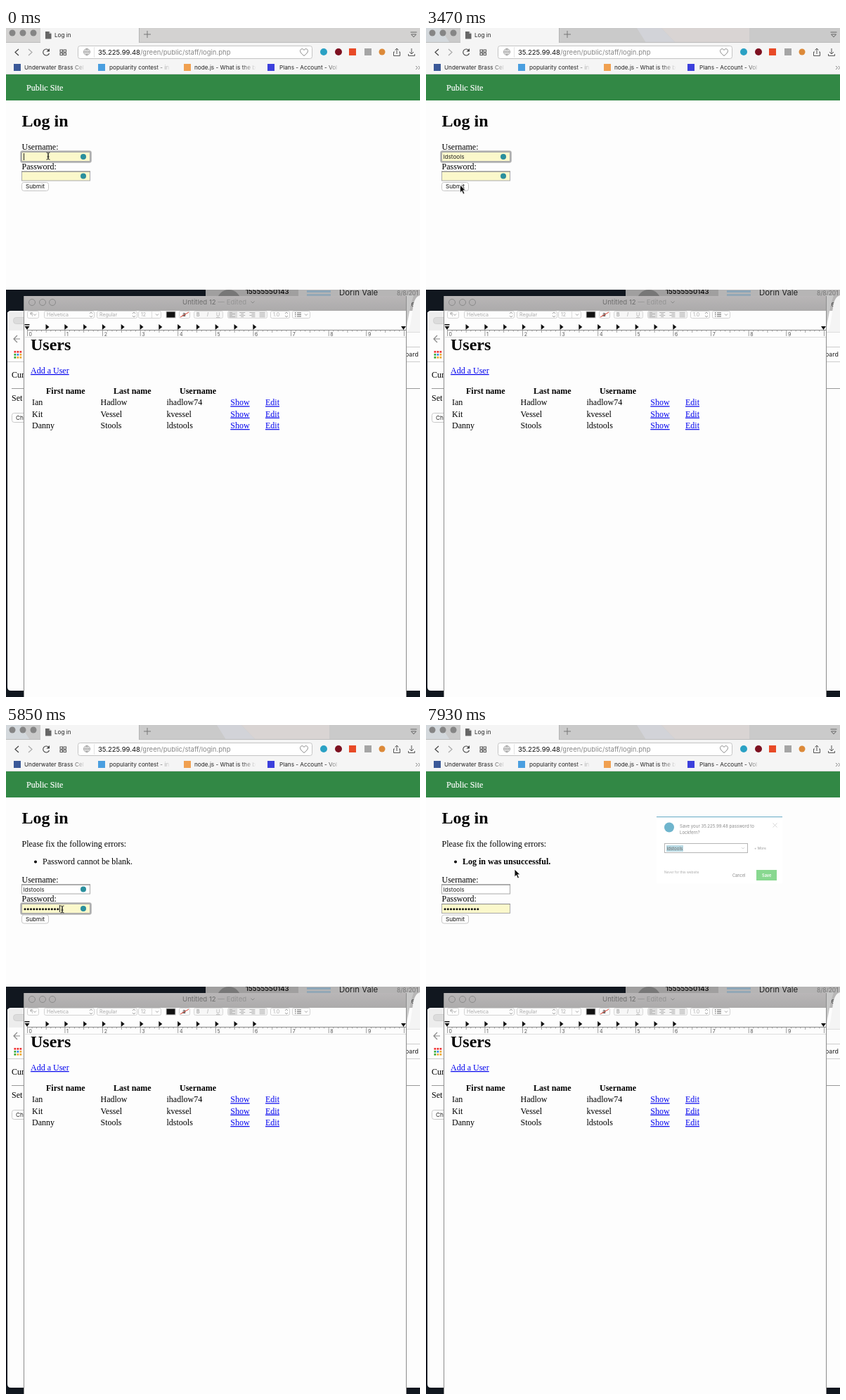
Recreate the animation shown at these times as an HTML page. Size 589 by 951 pixels, loop 8000 ms.

```html
<!DOCTYPE html>
<html lang="en">
<head>
<meta charset="utf-8">
<title>Log in</title>
<style>
  html, body { margin: 0; height: 100%; overflow: hidden; background: #fdfdfd; }
  svg { display: block; width: 100vw; height: 100vh; }
  text { font: 12px "Liberation Serif", Times, serif; white-space: pre; }
  .ui { font-family: Inter, sans-serif; }
  .b { font-weight: bold; }
  .link { fill: #00e; text-decoration: underline; }
</style>
</head>
<body>
<svg viewBox="0 0 589 951" xmlns="http://www.w3.org/2000/svg">
  <defs>
    <linearGradient id="fade">
      <stop stop-color="#f5f5f5" stop-opacity="0"/>
      <stop offset=".6" stop-color="#f5f5f5"/>
    </linearGradient>
    <linearGradient id="title" x2="0" y2="1">
      <stop stop-color="#b9b6b7"/>
      <stop offset="1" stop-color="#acabab"/>
    </linearGradient>
  </defs>
  <g id="still"></g>
  <g id="live"></g>
</svg>
<script>
const LOOP = 8000, START = 1390, STEP = 148.2;
const USER = 'ldstools';

const rect = (x, y, w, h, fill, more = '') =>
  `<rect x="${x}" y="${y}" width="${w}" height="${h}" fill="${fill}" ${more}/>`;
const dot = (x, y, r, fill, more = '') =>
  `<circle cx="${x}" cy="${y}" r="${r}" fill="${fill}" ${more}/>`;
const line = (d, color, width = 1, fill = 'none') =>
  `<path d="${d}" fill="${fill}" stroke="${color}" stroke-width="${width}"/>`;
const shape = (d, fill) => `<path d="${d}" fill="${fill}"/>`;
const text = (x, y, s, more = '') => `<text x="${x}" y="${y}" ${more}>${s}</text>`;
const serif = (x, y, s, size = 12, cls = '') =>
  text(x, y, s, `class="${cls}" style="font-size:${size}px"`);
const ui = (x, y, s, size = 8.2, fill = '#222', weight = 400) =>
  text(x, y, s, `class="ui" fill="${fill}" style="font-size:${size}px;font-weight:${weight}"`);
const box = (x, y, w, h, r = 2, fill = '#fff', stroke = '#c8c8c8') =>
  rect(x + .5, y + .5, w - 1, h - 1, fill, `rx="${r}" stroke="${stroke}"`);
const range = n => [...Array(n).keys()];

function browser() {
  const marks = [
    [11, '#3b5998', 26, 'Underwater Brass Cel'],
    [131, '#4a9fe0', 147, 'popularity contest - in'],
    [253, '#f0a050', 268, 'node.js - What is the b'],
    [372, '#3c40dc', 389, 'Plans - Account - Vol'],
  ];
  return rect(0, 0, 589, 372, '#fdfdfd') +
    rect(0, 21, 589, 45, '#f5f5f5') +
    line('M15 0m3 30l-5 4.5 5 4.5', '#444', 1.2) +
    line('M32 30l5 4.5-5 4.5', '#aaa', 1.2) +
    [[77, 31], [82, 31], [77, 35.5], [82, 35.5]]
      .map(([x, y]) => rect(x, y, 3.5, 3, 'none', 'stroke="#555"')).join('') +
    box(102, 25, 334, 19, 3, '#fff', '#c4c4c4') +
    dot(115, 34, 4.5, 'none', 'stroke="#888" stroke-width=".8"') +
    line('M110.500 34h9M115 29.500v9M115 29.500q-5 4.500 0 9q5-4.500 0-9', '#888', .7) +
    line('M125.500 27v15', '#e2e2e2') +
    ui(131, 38, '35.225.99.48<tspan fill="#888">/green/public/staff/login.php</tspan>', 9.5, '#111') +
    line('M424 39.500c-3-2.500-5.500-4.500-5.500-7c0-3 4-4 5.500-1c1.500-3 5.500-2 5.500 1c0 2.500-2.500 4.500-5.500 7z', '#888') +
    dot(452, 34, 5, '#2ba1c4') + dot(473, 34, 5, '#7d1020') +
    rect(488, 29, 10, 10, '#e84a27') + rect(510, 29, 10, 10, '#a5a5a5') +
    dot(535, 34, 4.5, '#dc8a3a') +
    line('M553 34h-1.500v5.500h9V34H559M556 37v-8m-2.500 2.500l2.500-2.500 2.500 2.500', '#555') +
    line('M572.500 37v2.500h9V37M577 29v8m-3-3l3 3 3-3', '#555') +
    marks.map(([x, color, tx, s]) =>
      rect(x, 51, 10, 10, color) + ui(tx, 59, s) +
      rect(tx + 66, 49, 36, 14, 'url(#fade)')).join('') +
    line('M583 54l2.500 2.500-2.500 2.500m3.500-5l2.500 2.500-2.500 2.500', '#666', .8) +
    rect(0, 65, 589, 1, '#d8d8d8') +
    rect(0, 66, 589, 37, '#328845') +
    text(29, 89, 'Public Site', 'fill="#fff" stroke="#fff" stroke-width=".2"') +
    serif(22.5, 140, 'Log in', 24, 'b');
}

function desktop() {
  const apps = ['#e33', '#e33', '#e33', '#3a3', '#38e', '#ea3', '#3a3', '#ea3', '#ea3'];
  return rect(0, 371, 589, 580, '#11171f') +
    rect(284, 372, 305, 40, '#a09f9f') + rect(416, 372, 173, 40, '#b6b5b5') +
    dot(317, 389, 17, '#777') +
    ui(341, 378, '15555550143', 9.5, '#111', 600) +
    rect(428, 373, 34, 3, '#8ba5b8') + rect(428, 378, 34, 4, '#93a8b6') +
    ui(474, 380, 'Dorin Vale', 11.4, '#222') +
    ui(556, 380, '8/8/201', 8.5, '#777') + ui(568, 396, 'me...', 9.5, '#444') +
    shape('M2 407q0-5 5-5H589V942H7q-5 0-5-5z', '#fdfdfd') +
    rect(2, 404, 24, 26, '#ededed') + box(10, 411, 24, 10, 4, '#dcdcdc', '#d0d0d0') +
    shape('M569 380h11q-7 22-11 52z', '#c8c8c8') +
    shape('M589 380v52h-20q5 0 7-15l3-20q2-15 10-17z', '#f4f4f4') +
    line('M20 442H11m5-5l-5 5 5 5', '#888', 1.2) +
    apps.map((c, i) => rect(11.5 + i % 3 * 4, 459 + (i / 3 | 0) * 4, 2.7, 2.7, c)).join('') +
    rect(2, 474, 587, 1, '#ccc') + rect(569, 453, 20, 1, '#ccc') +
    rect(569, 432, 20, 1, '#ddd') + ui(568, 467, 'oard', 8.8) +
    serif(8, 497, 'Cur') + rect(8, 512, 581, 1, '#999') + serif(8, 530, 'Set') +
    box(8, 547, 30, 14, 3) + ui(14, 557, 'Ch');
}

function ruler() {
  const inch = 53.6;
  return rect(30, 429, 539, 1, '#888') + rect(27, 439, 542, 1, '#ddd') +
    range(81).map(i => rect(30 + i * inch / 8, 430, .7, i % 8 ? (i % 4 ? 1.5 : 3) : 8, '#777')).join('') +
    range(10).map(i => ui(32.5 + i * inch, 437.5, i, 7, '#555')).join('') +
    range(12).map(i => shape(`M${56.5 + i * 26.8} 421v8l5-4z`, '#111')).join('') +
    shape('M26.500 421h7v1.500h-7zM26.500 424h7l-3.500 5zM562 424h7l-3.500 5z', '#111');
}

function editor() {
  const popups = [[30, 17, '¶'], [54, 72, 'Helvetica'], [129, 58, 'Regular'], [188, 33, '12'], [376, 28, '1.0'], [407, 26, '']];
  const people = [
    ['Ian', 'Hadlow', 'ihadlow74'],
    ['Kit', 'Vessel', 'kvessel'],
    ['Danny', 'Stools', USER],
  ];
  const cols = [37, 134.5, 228.5];
  const align = [[4, 8, 4, 8], [8, 4, 8, 4], [8, 5, 8, 5], [8, 8, 8, 8]];
  return rect(25, 381, 545, 570, '#8c8c8c') + rect(26, 402, 543, 549, '#fdfdfd') +
    rect(26, 381, 543, 21, 'url(#title)') +
    [37, 52, 66].map(x => dot(x, 390, 4.5, 'none', 'stroke="#8b8b8b"')).join('') +
    ui(251, 393, 'Untitled 12 <tspan fill="#949494">— Edited</tspan>', 9.6, '#6e6e6e') +
    line('M348.500 388.500l2.500 2.500 2.500-2.500', '#888') +
    popups.map(([x, w, s]) => box(x, 402, w, 11, 2, '#fdfdfd', '#d2d2d2') +
      ui(x + 4, 410, s, 7, '#aaa') +
      line(w > 50 || s === '1.0'
        ? `M${x + w - 7} 406l2-2 2 2m0 3l-2 2-2-2`
        : `M${x + w - 8} 406.500l2 2 2-2`, '#888', .8)).join('') +
    rect(411, 404.5, 1, 1, '#555') + line('M411 405h1.500m1.500 0h6m-9 2.500h1.500m1.500 0h6m-9 2.500h1.500m1.500 0h6', '#666') +
    rect(207, 403, 1, 9, '#ddd') +
    rect(228, 403, 13, 9, '#111', 'stroke="#ccc"') +
    box(246, 402, 16, 11, 2, '#fdfdfd', '#d2d2d2') +
    ui(251, 410, 'a', 8, '#333', 600) + line('M248 411l12-7', '#d43b2b') +
    box(267, 402, 42, 11, 2, '#f7f7f7', '#d8d8d8') +
    ui(271, 410, 'B', 7, '#aaa', 700) + ui(286, 410, '<tspan font-style="italic">I</tspan>', 7, '#aaa') +
    ui(299, 410, '<tspan text-decoration="underline">U</tspan>', 7, '#aaa') +
    box(315, 402, 57, 11, 2, '#f5f5f5', '#d8d8d8') + rect(316, 403, 13, 9, '#ddd') +
    align.map((rows, i) => rows.map((w, j) =>
      rect(318 + i * 14.2 + [0, (8 - w) / 2, 8 - w, 0][i], 404 + j * 2, w, 1, '#b0b0b0')).join('')).join('') +
    ruler() +
    serif(35, 458, 'Users', 24, 'b') + serif(35, 491, 'Add a User', 12, 'link') +
    serif(57, 520, 'First name', 12, 'b') + serif(153, 520, 'Last name', 12, 'b') +
    serif(247, 520, 'Username', 12, 'b') +
    people.map((row, i) => {
      const y = 536.3 + i * 16.4;
      return row.map((s, j) => serif(cols[j], y, s)).join('') +
        serif(319.3, y, 'Show', 12, 'link') + serif(369, y, 'Edit', 12, 'link');
    }).join('');
}

function tabs(t, loading, step) {
  const spinner = range(10).map(i =>
    `<path d="M60 6.500v-2.500" stroke="#555" stroke-opacity="${.2 + (i + 10 - step % 10) % 10 * .08}" transform="rotate(${i * 36} 60 10)"/>`).join('');
  const page = shape('M56 5h5.500l3 3v7.500h-8.500z', '#666') + shape('M61.500 5v3h3z', '#ccc');
  const reload = line('M61 32a4.500 4.500 0 1 0 .5 4', '#444', 1.1) + shape('M62 29v4.500h-4.500z', '#444');
  return rect(0, 0, 589, 21, t < 150 ? '#d3d2d1' : '#cacaca') +
    (t < 150 ? '' : shape('M0 0h20l14 21H0z', '#d3d8dc') +
      shape('M300 0h35l20 21h-42z', '#d2d3d8') + shape('M335 0h125v21H355z', '#d9d4d3')) +
    [9, 24, 39].map(x => dot(x, 7, 4.5, '#858585')).join('') +
    rect(49, 0, 140, 21, '#f5f5f5') + rect(189, 0, 1, 21, '#b4b4b4') +
    rect(0, 20, 49, 1, '#bcbcbc') + rect(190, 20, 399, 1, '#bcbcbc') +
    (loading ? spinner + ui(69, 13, 'https://35.225.99.48/green/p', 8.2) + rect(168, 3, 21, 14, 'url(#fade)')
             : page + ui(69, 13, 'Log in', 8.1)) +
    line('M196 9h10m-5-5v10', '#777') +
    line('M575.500 6h9M576.500 9h7l-3.500 4z', '#666') +
    (loading ? line('M53 30.500l8 8m0-8l-8 8', '#444', 1.1) : reload);
}

function field(y, value, { focus, yellow, icon, caret }) {
  const x = 22;
  let s = focus ? rect(x - .5, y - .5, 99, 15, 'none', 'rx="2" stroke="#999" stroke-width="2.6" opacity=".75"') : '';
  s += rect(x + .5, y + .5, 97, 13, yellow ? '#fbf8cb' : '#fff', 'stroke="#aaa"');
  if (!focus) s += rect(x, y, 98, 1, '#888');
  let end = 24.5;
  if (typeof value === 'number') {
    s += range(value).map(i => dot(27 + i * 4.25, y + 7.7, 1.5, '#111')).join('');
    end += value * 4.25;
  } else {
    s += ui(24.5, y + 10, value, 8.2);
    end += value.length * 3.9;
  }
  if (icon) s += dot(110, y + 7, 4, '#2a8f9d');
  if (caret) s += rect(Math.round(end), y + 2, 1, 10, '#222');
  return s;
}

function popup() {
  return rect(328, 130, 179, 95, '#fff') + rect(328, 130, 179, 1.2, '#79b4cc') +
    dot(346, 145.5, 7, '#6fb5cd') +
    ui(361, 146, 'Save your 35.225.99.48 password to', 6.1, '#8a8a8a') +
    ui(361, 154.5, 'Lockfern?', 6.1, '#8a8a8a') +
    line('M493.500 139.500l6 6m0-6l-6 6', '#ccc', .8) +
    box(339, 168, 119, 14, 0, '#fff', '#b5b5b5') + rect(342, 171, 24, 9, '#b8d8e2') +
    ui(342.5, 177.7, USER, 6.2, '#666') + line('M449 174l2 2 2-2', '#ccc', .8) +
    ui(467, 177, '+ More', 5, '#999') + ui(339, 211, 'Never for this website', 4.8, '#aaa') +
    ui(436, 216, 'Cancel', 5.6, '#888') +
    rect(470, 206, 29, 15, '#88d890') + ui(478, 216, 'Save', 5.6, '#fff', 600);
}

// Pointer stops: step, x, y
const path = [
  [-10, 60, 182], [8, 60, 182], [9, 78, 190], [10, 78, 190], [15, 45, 227], [19, 45, 227],
  [22, 230, 252], [24, 225, 256], [26, 80, 262], [31, 80, 262], [34, 10, 290],
  [36, 38, 265], [39, 38, 265], [40, 42, 275], [41, 42, 275], [44, 126, 205], [46, 126, 205],
];

function pointer(step, fieldTops) {
  const i = path.findIndex(p => p[0] > step);
  const [a, b] = [path[i - 1], path[i]];
  const k = (step - a[0]) / (b[0] - a[0]), ease = k * k * (3 - 2 * k);
  const x = a[1] + (b[1] - a[1]) * ease, y = a[2] + (b[2] - a[2]) * ease;
  const over = x > 22 && x < 120 && fieldTops.some(top => y >= top && y < top + 14);
  return `<g transform="translate(${x} ${y})">` + (over
    ? line('M-2.500-5q2.500 0 2.500 1.500v7q0 1.500-2.500 1.500M2.500-5q-2.500 0-2.500 1.500v7q0 1.500 2.500 1.500M-1.500 1h3', '#222')
    : line('M0 0v11l2.500-2.500 2 4.500 2-1-2-4.300h3.500z', '#fff', .8, '#111')) + '</g>';
}

function scene(t) {
  const step = t < START ? -1 : Math.floor((t - START) / STEP);
  const loading = step >= 17 && step < 20 || step >= 41 && step < 43;
  const errors = step >= 20, failed = step >= 43;
  const shift = errors ? 50.5 : 0;
  const top1 = 176 + shift, top2 = 203.5 + shift;
  const passFocus = step >= 26 && step < 41;
  const userFocus = step < 17;
  const icon = !errors || step >= 25 && !failed;
  const dots = !errors ? 0 : Math.max(0, Math.min(12, step < 35 ? (step - 26) * 3 : (step - 36) * 4));
  const typed = USER.slice(0, step + 1);
  const blink = step < 0 ? t < 510 || t >= 960 : step < 8;

  let s = tabs(t, loading, step);
  if (errors) {
    s += serif(22.5, 173, 'Please fix the following errors:') + dot(42, 194.5, 2, '#000') +
      (failed ? serif(52, 198, 'Log in was unsuccessful.', 12, 'b') : serif(52, 198, 'Password cannot be blank.'));
  }
  s += serif(22.5, 173 + shift, 'Username:') +
    field(top1, typed, { focus: userFocus, yellow: !errors, icon, caret: userFocus && blink }) +
    serif(22.5, 200.5 + shift, 'Password:') +
    field(top2, dots, { focus: passFocus, yellow: !errors || step >= 26, icon, caret: passFocus }) +
    box(22, 219 + shift, 39, 13, 3, '#fff', '#c6c6c6') + ui(28, 228 + shift, 'Submit', 8.2, '#111');
  if (step >= 44) s += popup();
  return s + pointer(step, [top1, top2]);
}

document.getElementById('still').innerHTML = desktop() + editor() + browser();
const live = document.getElementById('live');
let shown = '';
function draw() {
  const next = scene(performance.now() % LOOP);
  if (next !== shown) live.innerHTML = shown = next;
  requestAnimationFrame(draw);
}
draw();
</script>
</body>
</html>
```
